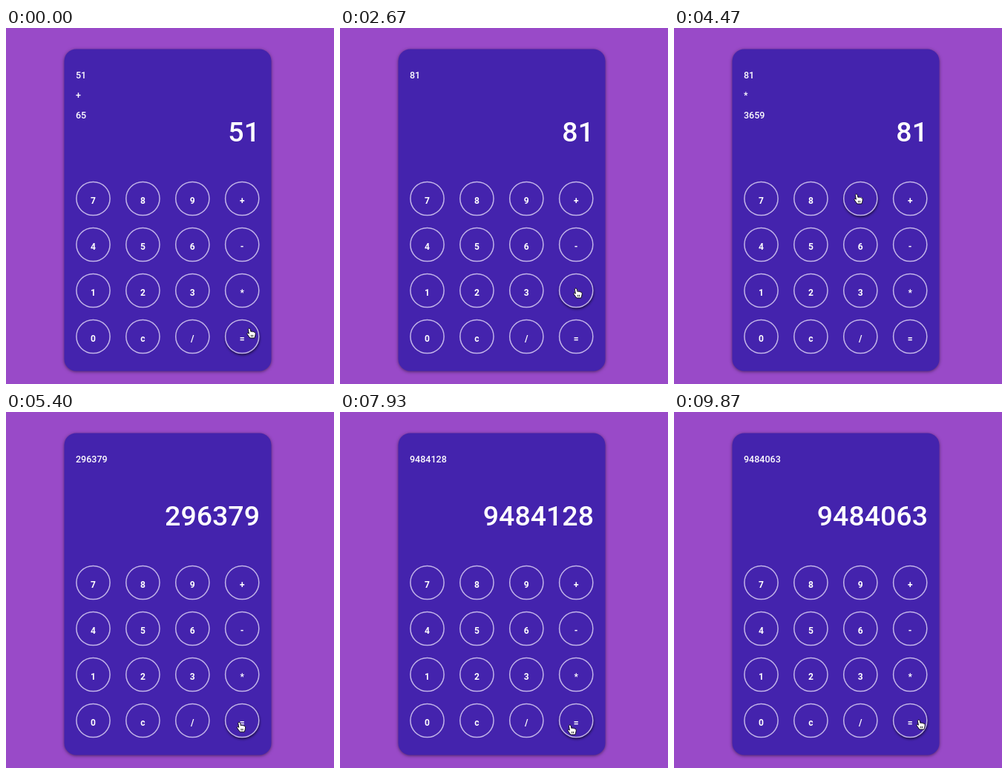
Write an HTML page that moves like this. It is 442 by 480 pixels and loops after 9.94 s.

```html
<!DOCTYPE html>
<html lang="en">
<head>
<meta charset="utf-8">
<title>Calculator</title>
<style>
  html, body { margin: 0; width: 100%; height: 100%; overflow: hidden; background: #994ac8; }
  svg { display: block; width: 442px; height: 480px; }
  text { font-family: Roboto, sans-serif; font-weight: 500; fill: #fff; }
  .card { fill: #4423ad; filter: drop-shadow(0 1px 2px rgba(0, 0, 0, .5)); }
  .past { font-size: 12.5px; }
  .total { font-size: 37.5px; text-anchor: end; }
  .key circle { fill: #4423ad; stroke: #c1b3e8; stroke-width: 1.5; }
  .key text { font-size: 12px; font-weight: 700; text-anchor: middle; }
  #shade { fill: #000; opacity: .5; filter: blur(1.6px); }
  #arrow { fill: #000; stroke: #fff; stroke-width: 1; }
  #hand { fill: #fff; stroke: #000; stroke-width: .9; stroke-linejoin: round; }
</style>
</head>
<body>
<svg viewBox="0 0 442 480">
  <rect class="card" x="78.5" y="28.5" width="279" height="434" rx="16"/>
  <text class="past" x="94" y="68"></text>
  <text class="past" x="94" y="95"></text>
  <text class="past" x="94" y="122"></text>
  <text class="total" x="342" y="153"></text>
  <circle id="shade" r="23.5"/>
  <g id="keys"></g>
  <g id="cursor">
    <path id="arrow" d="M0 0V11.5L2.6 9.1 4.3 13 6.2 12.2 4.5 8.4H8Z"/>
    <path id="hand" d="M-1.6 1.4C-1.6-.3 .8-.5 1.2 1.2L2 4.6C2.6 3.7 4 3.9 4.4 4.8C5.1 4.1 6.3 4.4 6.6 5.4C7.6 5 8.3 5.7 8.2 6.8C8.2 9.5 7.5 10.5 7 13H.8C-.2 11.2-2.2 9.4-3 7.6C-3.4 6.2-1.9 5.8-.6 7.2ZM2.6 8.8v2.4M4.6 8.8v2.4"/>
  </g>
</svg>
<script>
const LOOP = 9940, FPS = 15;
const $ = s => document.querySelector(s);
const show = (el, on) => el.style.display = on ? '' : 'none';

const keys = [...'789+456-123*0c/='].map((label, i) => ({
  label,
  x: 117.5 + (i % 4) * 66.9,
  y: 230 + Math.floor(i / 4) * 62
}));
$('#keys').innerHTML = keys.map(k =>
  `<g class="key"><circle cx="${k.x}" cy="${k.y}" r="22.6"/><text x="${k.x}" y="${k.y + 7.3}">${k.label}</text></g>`
).join('');

// Cursor stops: arrive, leave, x, y, key pressed midway (none = pass through)
const stops = [
  [0, 180, 328, 405, '='],
  [600, 750, 318, 288, '-'],
  [1250, 1380, 248, 350, '3'],
  [1533, 1533, 228, 316],
  [1750, 1950, 187, 290, '5'],
  [2250, 2400, 318, 412, '='],
  [2600, 2860, 318, 351, '*'],
  [3070, 3200, 250, 352, '3'],
  [3430, 3560, 252, 290, '6'],
  [3800, 3950, 186, 290, '5'],
  [4300, 4530, 246, 224, '9'],
  [4950, 5250, 314, 433, '='],
  [5800, 6150, 316, 352, '*'],
  [6400, 6400, 285, 359],
  [6600, 6750, 252, 356, '3'],
  [6930, 7060, 186, 352, '2'],
  [7600, 7950, 310, 422, '='],
  [8300, 8420, 318, 288, '-'],
  [8600, 8750, 252, 290, '6'],
  [8950, 9100, 186, 290, '5'],
  [9650, 9940, 330, 415, '=']
].map(([arrive, leave, x, y, key]) => ({ arrive, leave, x, y, key }));

function slope(i, axis) {
  if (stops[i].key) return 0;
  const a = stops[i - 1], b = stops[i + 1];
  return (b[axis] - a[axis]) / (b.arrive - a.leave);
}

function cursorAt(t) {
  const i = stops.findLastIndex(s => s.arrive <= t);
  const a = stops[i], b = stops[i + 1];
  if (t <= a.leave || !b) return a;
  const d = b.arrive - a.leave, u = (t - a.leave) / d, v = 1 - u;
  const at = axis =>
    a[axis] * v * v * (1 + 2 * u) + b[axis] * u * u * (3 - 2 * u) +
    d * u * v * (slope(i, axis) * v - slope(i + 1, axis) * u);
  return { x: at('x'), y: at('y') };
}

const ops = {
  '+': (a, b) => a + b,
  '-': (a, b) => a - b,
  '*': (a, b) => a * b,
  '/': (a, b) => a / b
};

function press(parts, key) {
  const [a, op, b = ''] = parts;
  if (key === '=') return [String(ops[op](+a, +b))];
  return ops[key] ? [a, key] : [a, op, b + key];
}

const partsAt = t => stops
  .filter(s => s.key && (s.arrive + s.leave) / 2 <= t)
  .reduce((parts, s) => press(parts, s.key), ['51', '+', '65']);

const past = document.querySelectorAll('.past');

function draw(t) {
  const parts = partsAt(t);
  past.forEach((el, i) => el.textContent = parts[i] || '');
  $('.total').textContent = parts[0];

  const { x, y } = cursorAt(t);
  const over = keys.find(k => Math.hypot(k.x - x, k.y - y) < 23.4);
  $('#cursor').setAttribute('transform', `translate(${x.toFixed(1)} ${y.toFixed(1)})`);
  show($('#hand'), over);
  show($('#arrow'), !over);
  show($('#shade'), over);
  if (over) $('#shade').setAttribute('transform', `translate(${over.x + .5} ${over.y + 2})`);
}

function tick() {
  const t = performance.now() % LOOP;
  draw(Math.floor((t + 3.5) * FPS / 1000) * 1000 / FPS);
  requestAnimationFrame(tick);
}
tick();
</script>
</body>
</html>
```
